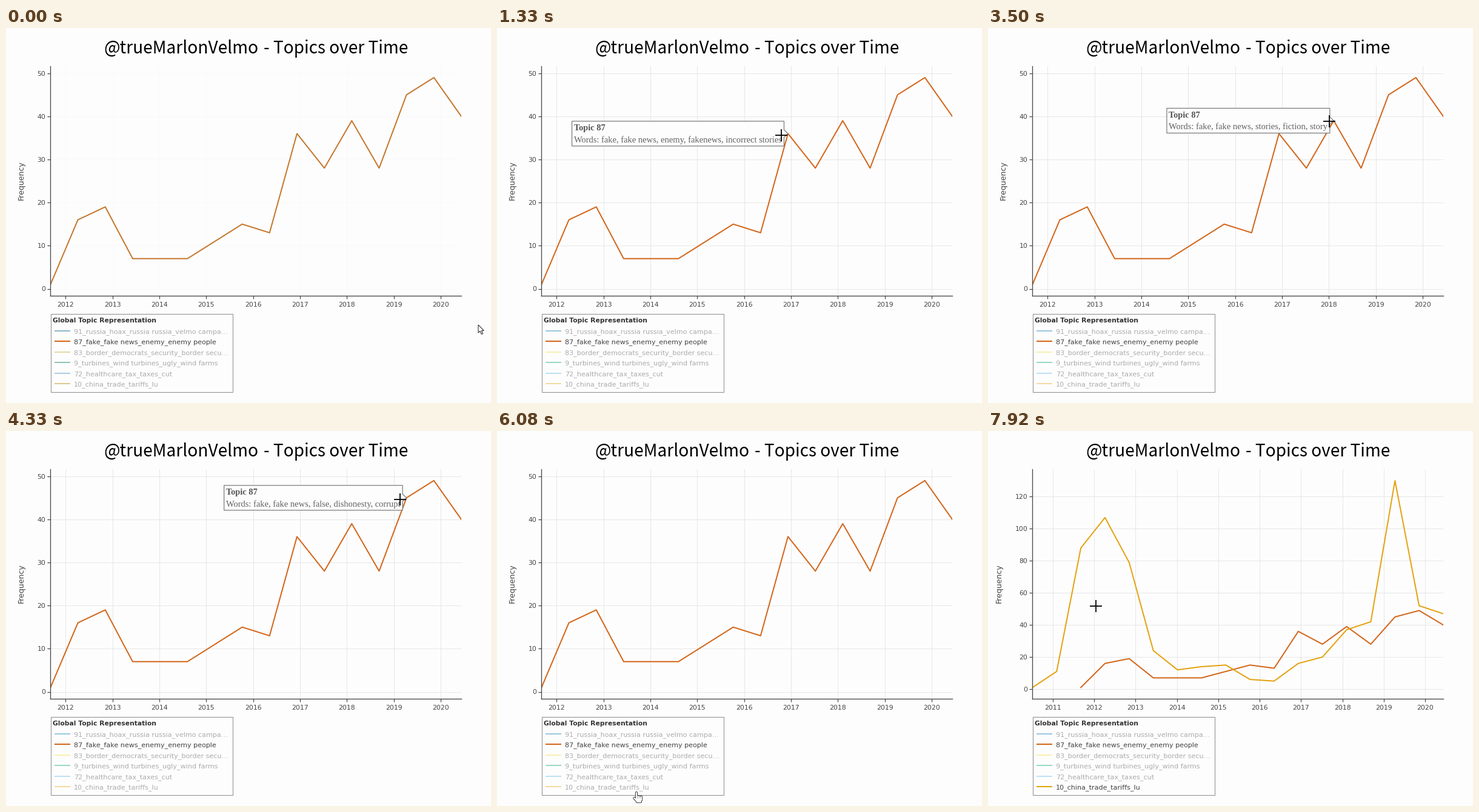
Animation, 800 px wide and 619 px high, one loop 8 s. Source, as a matplotlib script:

```python
import math

import matplotlib.pyplot as plt
import numpy as np
from matplotlib.animation import FuncAnimation
from matplotlib.colors import to_rgb
from matplotlib.patches import Polygon, Rectangle

W, H, DPI = 800, 619, 64
FRAMES, INTERVAL = 100, 80
PT = 72 / DPI  # points per pixel

BG, INK, MUTED = "#fefdfe", "#444444", "#adadad"
ORANGE, GOLD = "#d2661a", "#e3a30f"
LEFT, RIGHT, TOP, BOTTOM = 73.4, 751, 63, 442
STEP, END = 0.5842, 2020.44  # years between samples, last sample
SWITCH = 7150  # second topic is switched on

NEWS = [1, 16, 19, 7, 7, 7, 11, 15, 13, 36, 28, 39, 28, 45, 49, 40]
TRADE = [1, 11, 88, 107, 79, 24, 12, 14, 15, 6, 5, 16, 20, 37, 42, 130, 52, 47]
NEWS_SCALE, NEWS_ZERO = 7.116, 430.5
TRADE_SCALE, TRADE_ZERO = 2.646, 426

LEGEND = {
    "91_russia_hoax_russia russia_velmo campa…": "#0072b2",
    "87_fake_fake news_enemy_enemy people": ORANGE,
    "83_border_democrats_security_border secu…": "#f0d442",
    "9_turbines_wind turbines_ugly_wind farms": "#009e73",
    "72_healthcare_tax_taxes_cut": "#56b4e9",
    "10_china_trade_tariffs_lu": GOLD,
}
PICKED, ADDED = 1, 5  # legend rows: selected from the start, selected later

TIPS = {  # words by sample index
    9: "fake, fake news, enemy, fakenews, incorrect stories",
    11: "fake, fake news, stories, fiction, story",
    13: "fake, fake news, false, dishonesty, corrupt",
}


def mix(a, b, k):
    return tuple(np.array(to_rgb(a)) * (1 - k) + np.array(to_rgb(b)) * k)


def ease(t, start, end):
    s = min(max((t - start) / (end - start), 0), 1)
    return s * s * (3 - 2 * s)


def sample_px(i):
    gap = (RIGHT - LEFT) / (len(NEWS) - 1)
    return np.array([LEFT + gap * i, NEWS_ZERO - NEWS_SCALE * NEWS[i]])


# the pointer rests at each stop and glides to the next during a move
ANCHORS = {i: sample_px(i) for i in TIPS}
STOPS = np.array([(779, 490), *(a + (-11, 3) for a in ANCHORS.values()),
                  (230, 595), (217, 589), (178, 289)])
MOVES = [(80, 1050), (1750, 2100), (3420, 3920), (5080, 6050), (6420, 7000),
         (7170, 7900)]

fig = plt.figure(figsize=(W / DPI, H / DPI), dpi=DPI, facecolor=BG)

chart = fig.add_axes([LEFT / W, 1 - BOTTOM / H,
                      (RIGHT - LEFT) / W, (BOTTOM - TOP) / H], facecolor=BG)
chart.set_axisbelow(True)
for side in ("top", "right"):
    chart.spines[side].set_visible(False)
for side in ("left", "bottom"):
    chart.spines[side].set(color=INK, linewidth=1.3 * PT)
chart.tick_params(length=5 * PT, width=1.2 * PT, color=INK, labelcolor=INK,
                  labelsize=10.9 * PT, labelfontfamily="DejaVu Sans")
chart.tick_params(axis="x", pad=5.5 * PT)
chart.tick_params(axis="y", pad=3 * PT)


def curve(values, color):
    years = END - STEP * np.arange(len(values))[::-1]
    return chart.plot(years, values, color=color, lw=2 * PT,
                      solid_joinstyle="round")[0]


news = curve(NEWS, ORANGE)
trade = curve(TRADE, GOLD)

stage = fig.add_axes([0, 0, 1, 1])
stage.set(xlim=(0, W), ylim=(H, 0))
stage.axis("off")


def label(x, y, text, size, color=INK, font="DejaVu Sans", **kw):
    return stage.text(x, y, text, fontsize=size * PT, color=color,
                      family=font, **kw)


for right, text in ((416, "@trueMarlonVelmo"), (663, "- Topics over Time")):
    label(right, 42, text, 28, "black", "Noto Sans CJK JP", ha="right")
y_title = label(25, 252, "Frequency", 12.5, rotation=90, ha="center", va="center")

stage.add_patch(Rectangle((74, 472), 300, 129, fc=BG, ec="#8c8c8c", lw=PT))
label(77, 486, "Global Topic Representation", 10.8, "#333333", weight="bold")
rows = []
for i, (text, color) in enumerate(LEGEND.items()):
    y = 499.5 + 17.5 * i
    key, = stage.plot([80, 106], [y, y], lw=2 * PT, solid_capstyle="butt")
    rows.append((key, label(112, y + 4.3, text, 11.1), color))

SERIF = "Liberation Serif"
tip_box = stage.add_patch(Polygon([(0, 0)], fc=BG, ec="#777777", lw=1.2 * PT, zorder=5))
tip_head = label(0, 0, "Topic 87", 14.4, "#555555", SERIF, weight="bold", zorder=6)
tip_words = label(0, 0, "", 14.5, "#606060", SERIF, zorder=6)
tip_parts = (tip_box, tip_head, tip_words)


def stroke(color, width, cap="round"):
    return stage.plot([], [], color=color, lw=width * PT, solid_capstyle=cap, zorder=8)[0]


cross = stroke("black", 1.8, "butt")
hand = [stroke("#333333", 4.2), stroke("white", 2.3)]
arrow = stage.add_patch(Polygon([(0, 0)], fc="white", ec="#333333", lw=1.1 * PT, zorder=8))

CROSS = np.array([(-10, 0), (10, 0), (np.nan, 0), (0, -10), (0, 10)])
ARROW = np.array([(0, 0), (0, 13), (3, 10.3), (5.3, 15.5), (7.5, 14.5),
                  (5.3, 9.5), (9.3, 9.5)])


def hand_strokes():
    fingers = [((2.7 * i, 2 if i == 0 else 7.5 + 0.5 * i), (2.7 * i, 14))
               for i in range(4)]
    palm = [((1, y), (7, y)) for y in (13, 15, 17)]
    thumb = [((-3.5, 11), (1, 16))]
    return np.array([p for a, b in fingers + palm + thumb
                     for p in (a, b, (np.nan, np.nan))])


HAND = hand_strokes()


def set_view(values, scale, zero, first_year, y_ticks):
    chart.set_xlim(END - STEP * (len(values) - 1), END)
    chart.set_ylim((zero - BOTTOM) / scale, (zero - TOP) / scale)
    years = range(first_year, 2021)
    chart.set_xticks(years, [str(v) for v in years])
    chart.set_yticks(y_ticks, [str(v) for v in y_ticks])


def pointer_at(t):
    pos = STOPS[0]
    for (start, end), a, b in zip(MOVES, STOPS, STOPS[1:]):
        pos = pos + (b - a) * ease(t, start, end)
    return pos


def draw_tip(pos):
    near = next((i for i, a in ANCHORS.items() if math.dist(a, pos) < 24), None)
    for part in tip_parts:
        part.set_visible(near is not None)
    if near is None:
        return
    x, y = ANCHORS[near]
    tip_words.set_text("Words: " + TIPS[near])
    right, top, low = x - 6.5, y - 20.5, y + 20.5
    left = right - tip_words.get_window_extent().width - 7
    tip_box.set_xy([(left, top), (right, top), (right, y - 6), (x, y),
                    (right, y + 6), (right, low), (left, low)])
    tip_head.set_position((left + 3.5, top + 15.5))
    tip_words.set_position((left + 3.5, top + 35))


def draw_pointer(pos):
    x, y = pos
    in_plot = LEFT < x < RIGHT and TOP < y < BOTTOM
    in_legend = 74 < x < 374 and 472 < y < 601
    cross.set_visible(in_plot)
    arrow.set_visible(not (in_plot or in_legend))
    cross.set_data(*(CROSS + pos).T)
    arrow.set_xy(ARROW + pos)
    for layer in hand:
        layer.set_visible(in_legend)
        layer.set_data(*(HAND + pos).T)


def draw(n):
    t = (n + 0.5) * INTERVAL
    both = t >= SWITCH
    if both:
        set_view(TRADE, TRADE_SCALE, TRADE_ZERO, 2011, range(0, 121, 20))
    else:
        set_view(NEWS, NEWS_SCALE, NEWS_ZERO, 2012, range(0, 51, 10))
    trade.set_visible(both)
    y_title.set_x(18 if both else 25)

    # grid and colours settle in at the start
    k = ease(t, 80, 830)
    chart.grid(True, color="#e7e7e7", lw=PT, alpha=0.15 + 0.85 * k)
    news.set_color(mix("#c4772c", ORANGE, k))
    for i, (key, name, color) in enumerate(rows):
        on = i == PICKED or (i == ADDED and both)
        faded = mix(mix(color, "#bbbbbb", 0.5 - 0.5 * k), "white", 0.6 * k + 0.3 * (1 - k))
        key.set_color(color if on else faded)
        name.set_color(INK if on else MUTED)

    pos = pointer_at(t)
    draw_tip(pos)
    draw_pointer(pos)
    return []


anim = FuncAnimation(fig, draw, frames=FRAMES, interval=INTERVAL,
                     repeat=True, repeat_delay=0, blit=False)
plt.show()
```
